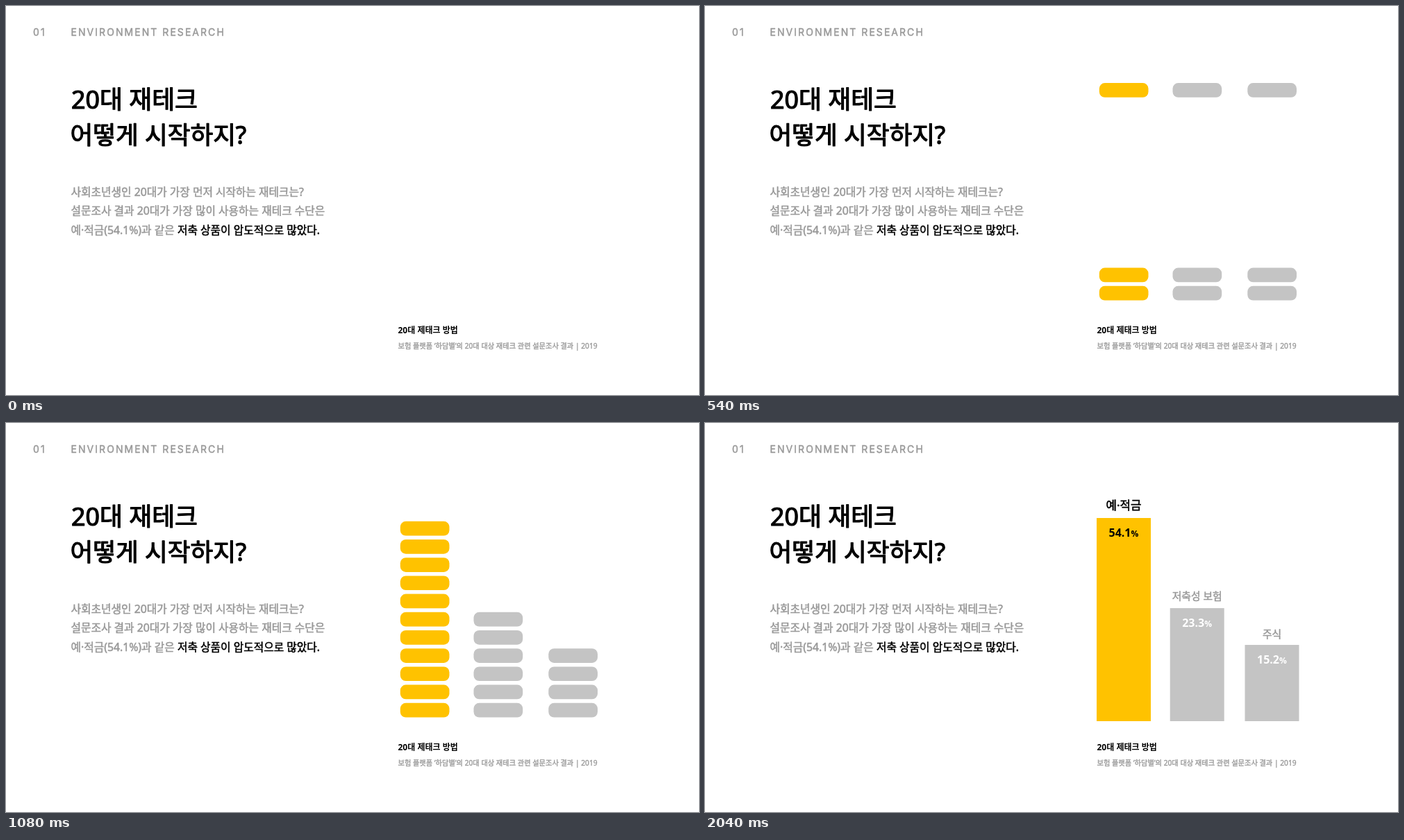
An HTML page with a canvas that plays this animation: 998 px wide and 561 px high, repeating every 5400 ms.

```html
<!DOCTYPE html>
<html lang="ko">
<head>
<meta charset="utf-8">
<title>Environment Research</title>
<style>
html, body { margin: 0; width: 100%; height: 100%; overflow: hidden; background: #fff; }
canvas { display: block; width: 998px; height: 561px; }
</style>
</head>
<body>
<canvas id="stage" width="998" height="561"></canvas>
<script>
const ctx = document.getElementById('stage').getContext('2d');
const LOOP = 5400, STEP = 30;
const SANS = '"Noto Sans", "Noto Sans CJK KR", "Noto Sans CJK", sans-serif';
const HEAD = 'Inter, sans-serif';
const YELLOW = '#ffc200', GRAY = '#c4c4c4', INK = '#000', MUTED = '#999';
const FLOOR = 403.8, PITCH = 26.2;

const columns = [
  { x: 564, top: 137, count: 11, color: YELLOW, name: '예·적금', size: 16.8, nameY: 125, ink: INK, value: '54.1', valueInk: INK },
  { x: 669.7, top: 267, count: 6, color: GRAY, name: '저축성 보험', size: 14.8, nameY: 254.7, ink: MUTED, value: '23.3', valueInk: '#fff' },
  { x: 777.5, top: 320, count: 4, color: GRAY, name: '주식', size: 14.8, nameY: 310, ink: MUTED, value: '15.2', valueInk: '#fff' }
];

const clamp = v => Math.max(0, Math.min(1, v));

function text(str, x, y, size, weight, color, align = 'left', family = SANS) {
  // Medium is built from regular plus a thin outline.
  const medium = weight === 500;
  ctx.font = `${medium ? 400 : weight} ${size}px ${family}`;
  ctx.fillStyle = ctx.strokeStyle = color;
  ctx.textAlign = align;
  ctx.fillText(str, x, y);
  if (medium) {
    ctx.lineWidth = size * 0.034;
    ctx.lineJoin = 'round';
    ctx.strokeText(str, x, y);
  }
}

function drawCopy() {
  ctx.letterSpacing = '2.05px';
  text('01', 39, 43, 14, 500, MUTED, 'left', HEAD);
  text('ENVIRONMENT RESEARCH', 93.5, 43, 14, 500, MUTED, 'left', HEAD);
  ctx.letterSpacing = '0px';
  text('20대 재테크', 94, 147.5, 35.8, 500, INK);
  text('어떻게 시작하지?', 92.5, 198.5, 35.6, 500, INK);
  text('사회초년생인 20대가 가장 먼저 시작하는 재테크는?', 93.5, 274, 15.77, 500, MUTED);
  text('설문조사 결과 20대가 가장 많이 사용하는 재테크 수단은', 93.5, 301, 15.77, 500, MUTED);
  text('예·적금(54.1%)과 같은', 93.5, 328.5, 15.77, 500, MUTED);
  text('저축 상품이 압도적으로 많았다.', 247, 328.5, 15.77, 500, INK);
  text('20대 제태크 방법', 564.5, 471.5, 12, 700, INK);
  text('보험 플랫폼 ‘하담별’의 20대 대상 재테크 관련 설문조사 결과 | 2019', 564.5, 494, 10.23, 500, MUTED);
}

// Top edge of a block, or null before it enters.
function blockY(i, step) {
  const rest = FLOOR - i * PITCH;
  if (i < 4) {
    const n = step - 1 - i * 7;
    if (n < 0) return null;
    const start = i < 3 ? 4 : 0;
    return n > 5 ? rest : Math.min(rest, start + 10.94 * n ** 2.076);
  }
  const landing = 26 + i;
  if (step >= landing) return rest;
  return i === 4 && step === landing - 1 ? rest / 2 : null;
}

function drawBlocks(col, step) {
  ctx.fillStyle = col.color;
  for (let i = 0; i < col.count; i++) {
    const y = blockY(i, step);
    if (y === null) continue;
    ctx.beginPath();
    ctx.roundRect(col.x + 3.8, y, 70.7, 20.7, 8);
    ctx.fill();
  }
}

function drawBar(col, alpha) {
  const h = 430 - col.top;
  ctx.globalAlpha = alpha;
  ctx.fillStyle = col.color;
  ctx.fillRect(col.x, col.top, 78, h);
  ctx.globalAlpha = 4 * alpha * (1 - alpha);
  ctx.strokeStyle = '#cecece';
  ctx.lineWidth = 1;
  ctx.strokeRect(col.x + 0.5, col.top + 0.5, 77, h - 1);
  ctx.globalAlpha = 1;
}

function drawLabels(col, alpha) {
  const mid = col.x + 39, y = col.top + 27;
  ctx.globalAlpha = alpha;
  text(col.name, mid, col.nameY, col.size, 500, col.ink, 'center');
  text(col.value, mid + 10.5, y, 16, 700, col.valueInk, 'right');
  text('%', mid + 10.5, y, 12, 700, col.valueInk);
  ctx.globalAlpha = 1;
}

function draw(now) {
  const step = Math.floor((now % LOOP) / STEP);
  const barAlpha = clamp((step - 44) / 19) ** 1.04;
  const labelAlpha = clamp((step - 63) / 5);
  ctx.fillStyle = '#fff';
  ctx.fillRect(0, 0, 998, 561);
  drawCopy();
  for (const col of columns) {
    drawBlocks(col, step);
    if (barAlpha > 0) drawBar(col, barAlpha);
    if (labelAlpha > 0) drawLabels(col, labelAlpha);
  }
}

let origin = null;
function tick(now) {
  if (origin === null) origin = now;
  draw(now - origin);
  requestAnimationFrame(tick);
}
draw(0);
requestAnimationFrame(tick);
</script>
</body>
</html>
```
